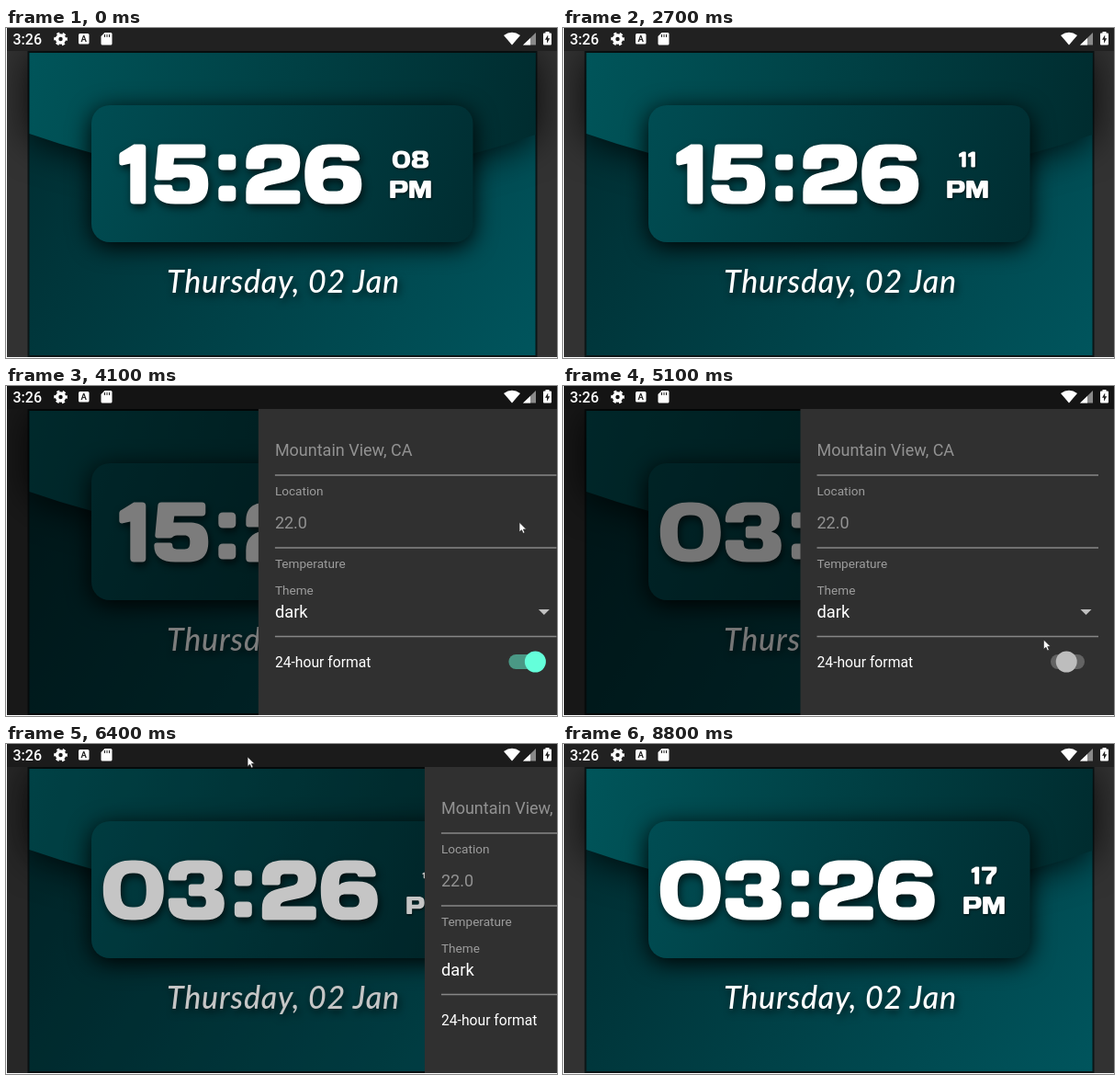
These frames come from a looping animation (600 px wide and 359 px high, 9.2 s). An HTML page:

```html
<!DOCTYPE html>
<html lang="en">
<head>
<meta charset="utf-8">
<title>Clock with settings drawer</title>
<style>
  html, body { margin: 0; height: 100%; overflow: hidden; background: #fff; }
  svg { display: block; width: 100%; height: 100%; font-family: Roboto, sans-serif; }
  #flap { filter: drop-shadow(0 3px 20px #000d); }
  #card { filter: drop-shadow(0 5px 13px #000); }
  .lit { fill: #fff; fill-rule: evenodd; filter: drop-shadow(2px 4px 4px #000a); }
  .date { font: italic 500 34px Lato, sans-serif; letter-spacing: .8px; }
  .field { font-size: 18px; fill: #929292; }
  .hint { font-size: 13.6px; fill: #9c9c9c; }
</style>
</head>
<body>
<svg viewBox="0 0 600 359">
  <defs>
    <linearGradient id="flapFill" gradientUnits="userSpaceOnUse" x1="25" y1="27" x2="577" y2="164"><stop stop-color="#00555a"/><stop offset="1" stop-color="#002b2e"/></linearGradient>
    <linearGradient id="bodyFill" gradientUnits="userSpaceOnUse" x1="25" y1="27" x2="577" y2="356"><stop stop-color="#002c30"/><stop offset="1" stop-color="#00555d"/></linearGradient>
    <linearGradient id="cardFill" gradientUnits="userSpaceOnUse" x1="93" y1="84" x2="509" y2="233"><stop stop-color="#004d53"/><stop offset="1" stop-color="#002d31"/></linearGradient>
    <clipPath id="stage"><rect y="25" width="600" height="334"/></clipPath>
    <g id="gear" fill="none">
      <circle r="6.400" stroke-width="5.600"/>
      <circle r="10" stroke-width="3.800" pathLength="12" stroke-dasharray="1" transform="rotate(-15)"/>
    </g>
  </defs>

  <rect width="600" height="359" fill="#323232"/>
  <g clip-path="url(#stage)">
    <rect x="23.5" y="25" width="555" height="333" fill="#0b1516"/>
    <rect x="25.5" y="27" width="551" height="329" fill="url(#bodyFill)"/>
    <path id="flap" d="M25.5 27H576.5V116Q301 212 25.5 115Z" fill="url(#flapFill)"/>
    <rect id="card" x="93" y="84" width="415.500" height="149" rx="20" fill="url(#cardFill)"/>
    <g id="time" class="lit" role="img"></g>
    <g id="seconds" class="lit" role="img"></g>
    <g id="period" class="lit" role="img"></g>
    <text class="lit date" x="175" y="288">Thursday, 02 Jan</text>
    <use id="settings" href="#gear" x="574" y="52" stroke="#c4cccc"/>
    <rect id="scrim" width="600" height="359"/>

    <g id="drawer">
      <rect y="25" width="345" height="334" fill="#303030"/>
      <path d="M18 97H324.500M18 176H324.500M18 272.500H324.500" stroke="#868686" stroke-width="1.300"/>
      <text class="field" x="18" y="76">Mountain View, CA</text>
      <text class="hint" x="18" y="119">Location</text>
      <text class="field" x="18" y="155">22.0</text>
      <text class="hint" x="18" y="198">Temperature</text>
      <text class="hint" x="18" y="227">Theme</text>
      <text x="18" y="252" font-size="18.3" fill="#fff">dark</text>
      <path d="M305 243h12l-6 6Z" fill="#c0c0c0"/>
      <text x="18" y="306" font-size="15.7" fill="#fff">24-hour format</text>
      <rect id="track" x="272.500" y="292" width="37" height="16" rx="8"/>
      <circle id="thumb" cy="300" r="11.500"/>
    </g>
  </g>

  <rect width="600" height="25" fill="#212121"/>
  <rect id="barShade" width="600" height="25"/>
  <g fill="#fff">
    <text x="7.500" y="18" font-size="16" font-weight="500">3:26</text>
    <use href="#gear" transform="translate(59.500 12) scale(.62)" stroke="#fff"/>
    <rect x="79" y="6" width="11.500" height="11.500" rx="1.500"/>
    <text x="84.750" y="15.200" font-size="9.500" font-weight="700" fill="#212121" text-anchor="middle">A</text>
    <path d="M107.500 5H114q1.500 0 1.500 1.500V17q0 1.500-1.500 1.500H105q-1.500 0-1.500-1.500V9Z"/>
    <path d="M107.500 7v3M110 7v3M112.500 7v3" stroke="#212121"/>
    <path d="M542 8Q551 1.500 560 8L551 18.500Z"/>
    <path d="M577 5V18.500H563Z" fill="#8a8a8a"/><path d="M571 11V18.500H563Z"/>
    <path d="M587.500 5.500V4h4v1.500H593q1 0 1 1V17.500q0 1-1 1H586q-1 0-1-1V6.500q0-1 1-1Z"/>
    <path d="M590.200 7.500L587 12.700h2v4l3.200-5.400h-2Z" fill="#212121"/>
  </g>
  <path id="pointer" d="M0 0V10.500L2.500 8.300L4.200 12L6 11.200L4.400 7.600H7.700Z" fill="#fff" stroke="#222" stroke-width=".7"/>
  <path d="M.5 0V359M0 358.500H600" stroke="#fff"/>
</svg>

<script>
const LOOP = 9200;
const SMALL = 0.295;
const $ = id => document.getElementById(id);

// Wide display lettering: [width, outline], 65 units tall
const six = "M26 0H38C53 0 59 6 60 15Q60 18 57 18H43Q40 18 40 16C39 14 38 14 34 14H28C22 14 20 17 20 27C23 24 27 23 33 23H40C55 23 62 30 62 43C62 58 54 65 38 65H26C8 65 0 55 0 33S8 0 26 0ZM27 37C22 37 20 39 20 43S22 51 27 51H35C40 51 42 48 42 44S40 37 35 37Z";
const dot = "h9q5 0 5 5v7q0 5-5 5h-9q-5 0-5-5v-7q0-5 5-5Z";
const GLYPHS = {
  0: [66, "M31 0H35C56 0 66 12 66 32.500S56 65 35 65H31C10 65 0 53 0 32.500S10 0 31 0ZM32 14C22 14 19 19 19 32.500S22 51 32 51H34C44 51 47 46 47 32.500S44 14 34 14Z"],
  1: [33, "M16 0H25Q29 0 29 4V61Q29 65 25 65H16Q12 65 12 61V21L3 23Q0 23 0 20V12Q0 9 3 8Z"],
  2: [59, "M0 24V20C0 6 8 0 24 0H37C53 0 59 7 59 20C59 33 54 38 42 41L28 44C22 45 20 47 20 50H55Q59 50 59 54V61Q59 65 55 65H4Q0 65 0 61V52C0 40 6 34 18 31L31 28C37 27 39 25 39 20C39 16 37 15 33 15H26C21 15 20 17 20 20V24Q20 27 17 27H3Q0 27 0 24Z"],
  3: [61, "M0 20C0 6 9 0 24 0H38C53 0 59 6 59 17C59 25 56 30 50 32C58 34 61 39 61 47C61 59 54 65 39 65H24C8 65 0 59 0 46V44Q0 41 3 41H17Q20 41 20 44C20 49 22 51 27 51H35C40 51 41 49 41 45S39 39 35 39H25Q22 39 22 36V29Q22 26 25 26H34C38 26 39 24 39 20S37 14 34 14H26C21 14 20 16 20 20Q20 22 17 22H3Q0 22 0 20Z"],
  4: [62, "M28 0H46Q50 0 50 4V39H57Q62 39 62 43V49Q62 53 57 53H50V61Q50 65 46 65H34Q30 65 30 61V53H4Q0 53 0 49V42Q0 38 2 36L24 3Q26 0 28 0ZM30 19L18 39H30Z"],
  5: [59, "M8 0H52Q56 0 56 4V11Q56 15 52 15H22L21 22H38C53 22 59 29 59 43C59 58 52 65 36 65H23C8 65 0 59 0 47Q0 44 3 44H17Q20 44 20 47C20 50 22 51 26 51H33C38 51 39 48 39 43S37 36 33 36H25C22 36 21 37 20 38Q19 39 17 39H4Q1 39 1 36L4 4Q4 0 8 0Z"],
  6: [62, six],
  7: [56, "M4 0H52Q56 0 56 4V14C56 22 52 26 46 31C38 38 36 44 36 61Q36 65 32 65H20Q16 65 16 61C16 42 20 34 30 25C34 21 36 19 36 15H4Q0 15 0 11V4Q0 0 4 0Z"],
  8: [63, "M24 0H39C55 0 61 6 61 17C61 25 58 29 53 31C60 34 63 39 63 47C63 59 56 65 40 65H23C7 65 0 59 0 47C0 39 3 34 10 31C5 29 2 25 2 17C2 6 8 0 24 0ZM27 14C22 14 21 16 21 20S23 26 27 26H36C40 26 42 24 42 20S41 14 36 14ZM26 38C21 38 20 41 20 45S21 51 26 51H37C42 51 43 49 43 45S42 38 37 38Z"],
  9: [62, six, "rotate(180 31 32.5)"],
  ":": [31, `M11 11${dot}M11 45${dot}`],
  P: [66, "M4 0H44C60 0 66 7 66 22S60 45 44 45H20V61Q20 65 16 65H4Q0 65 0 61V4Q0 0 4 0ZM20 15V30H40C45 30 46 28 46 22.5S45 15 40 15Z"],
  M: [80, "M4 0H24Q27 0 28 3L40 33L52 3Q53 0 56 0H76Q80 0 80 4V61Q80 65 76 65H65Q61 65 61 61V25L48 61Q47 65 44 65H36Q33 65 32 61L19 25V61Q19 65 15 65H4Q0 65 0 61V4Q0 0 4 0Z"]
};

// Time, x, y of the pointer tip
const POINTER = [
  [2750, 606, 62], [3000, 590, 70], [3300, 577, 66], [3650, 565, 48], [3900, 565, 48],
  [4100, 559, 148], [4500, 546, 288], [4700, 541, 294], [5050, 541, 294],
  [5400, 420, 170], [5800, 222, 6], [6000, 230, 8], [6400, 263, 14], [6700, 280, -20]
];

const clamp = v => Math.min(1, Math.max(0, v));
const ramp = (t, start, length) => clamp((t - start) / length);
const easeOut = u => 1 - (1 - u) ** 3;

function write(id, text, x, y, scale) {
  const group = $(id);
  if (group.getAttribute("aria-label") !== text) {
    let at = 0, paths = "";
    for (const char of text) {
      const [width, outline, turn = ""] = GLYPHS[char];
      paths += `<path d="${outline}" transform="translate(${at}) ${turn}"/>`;
      at += width + 5;
    }
    group.innerHTML = `<g transform="translate(${(5 - at) / 2} -32.5)">${paths}</g>`;
    group.setAttribute("aria-label", text);
  }
  group.setAttribute("transform", `translate(${x} ${y}) scale(${scale})`);
}

function pointerAt(t) {
  const next = POINTER.findIndex(key => key[0] > t);
  if (next < 1) return [620, -40];
  const [t0, x0, y0] = POINTER[next - 1], [t1, x1, y1] = POINTER[next];
  const u = (t - t0) / (t1 - t0);
  return [x0 + (x1 - x0) * u, y0 + (y1 - y0) * u];
}

function drawClock(t) {
  const fullDay = t < 5050;
  const sideX = fullDay ? 440.5 : 458.5;
  const beat = Math.min(t, LOOP - 51) - 150;
  const tick = Math.floor(beat / 1000);
  const age = beat - tick * 1000;
  const shrinking = age < 380;
  const size = shrinking ? 1 - age / 380 : easeOut(ramp(age, 380, 320));
  const second = 8 + tick + (shrinking ? 0 : 1);
  write("time", fullDay ? "15:26" : "03:26", 255.3, 159, 1);
  write("seconds", String(second).padStart(2, "0"), sideX, 143, SMALL * size);
  write("period", "PM", sideX, 175.5, SMALL);
}

function drawDrawer(t) {
  const open = easeOut(ramp(t, 3910, 300)) - easeOut(ramp(t, 6326, 300));
  const on = 1 - ramp(t, 5000, 180);
  $("drawer").setAttribute("transform", `translate(${600 - 341.5 * open})`);
  $("scrim").setAttribute("opacity", 0.54 * open);
  $("barShade").setAttribute("opacity", 0.4 * open);
  $("thumb").setAttribute("cx", 280.5 + 21 * on);
  $("thumb").setAttribute("fill", on > 0.5 ? "#64ffda" : "#bdbdbd");
  $("track").setAttribute("fill", on > 0.5 ? "#4a9885" : "#636363");
  $("settings").setAttribute("opacity", t < 5000 ? ramp(t, 3200, 250) : 0);
}

function frame(now) {
  const t = now % LOOP;
  drawClock(t);
  drawDrawer(t);
  $("pointer").setAttribute("transform", `translate(${pointerAt(t)})`);
  requestAnimationFrame(frame);
}
requestAnimationFrame(frame);
</script>
</body>
</html>
```
